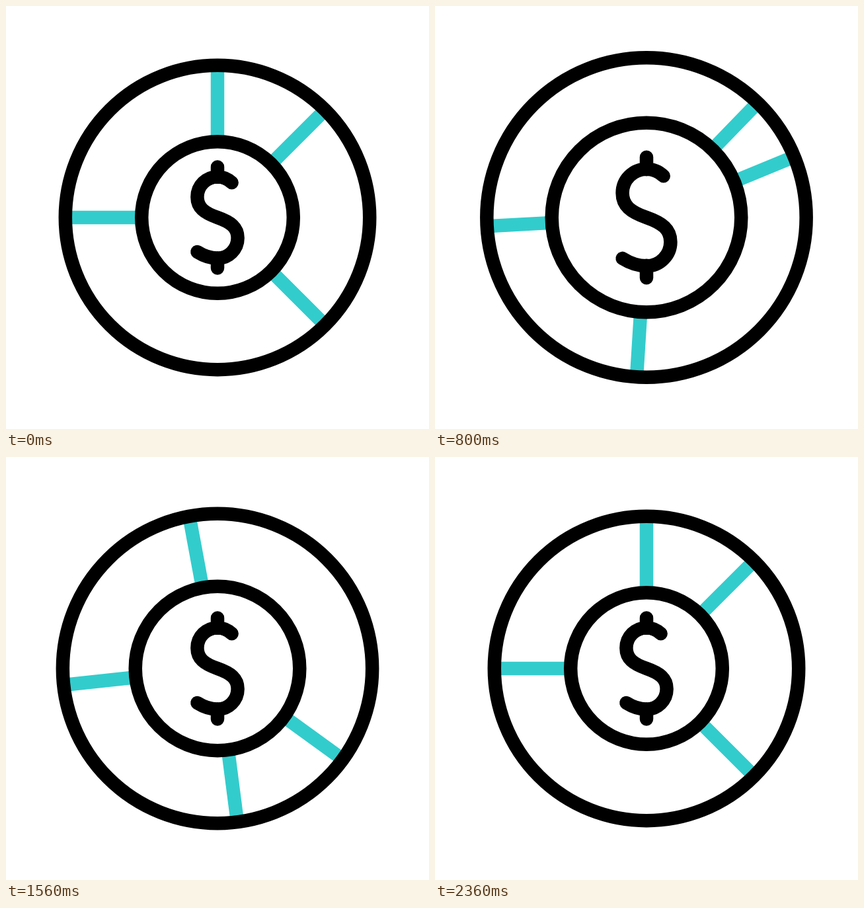
Recreate the animation shown at these times as an HTML page with a canvas. Size 640 by 640 pixels, loop 2420 ms.

```html
<!DOCTYPE html>
<html lang="en">
<head>
<meta charset="utf-8">
<title>Pie chart with dollar sign</title>
<style>
  html, body { margin: 0; width: 100%; height: 100%; overflow: hidden; background: #fff; }
  canvas { display: block; width: 100vmin; height: 100vmin; }
</style>
</head>
<body>
<canvas id="stage" width="640" height="640"></canvas>
<script>
const ctx = document.getElementById('stage').getContext('2d');
const LOOP = 2420, STEP = 20;
const STROKE = 20.5, OUTER = 230.2, INNER = 114.8, BOWL = 30.6;

// Ease in and out: a cubic curve with handles (0.46, 0) and (0.47, 1).
function ease(x) {
  if (x <= 0 || x >= 1) return x <= 0 ? 0 : 1;
  let lo = 0, hi = 1;
  while (hi - lo > 1e-6) {
    const u = (lo + hi) / 2, v = 1 - u;
    if (1.38 * u * v * v + 1.41 * u * u * v + u ** 3 < x) lo = u; else hi = u;
  }
  return lo * lo * (3 - 2 * lo);
}

const progress = (t, start, end) => ease((t - start) / (end - start));

// Scale that shrinks to a dip, swells to a peak, holds, then settles back to 1.
function pulse(t, { dip, dipAt, peak, peakAt, leaveAt, restAt }) {
  return 1 + (dip - 1) * progress(t, 100, dipAt)
    + (peak - dip) * progress(t, dipAt, peakAt)
    + (1 - peak) * progress(t, leaveAt, restAt);
}

const outerPulse = { dip: 0.845, dipAt: 335, peak: 1.05, peakAt: 812, leaveAt: 893, restAt: 2093 };
const innerPulse = { dip: 0.95, dipAt: 286, peak: 1.25, peakAt: 840, leaveAt: 943, restAt: 2037 };
const signPulse = { dip: 0.95, dipAt: 224, peak: 1.19, peakAt: 742, leaveAt: 955, restAt: 1486 };

// Every spoke makes one full turn, resting partway round.
const spokes = [
  { angle: 0, pause: 68.6 },
  { angle: 45, pause: 140.5 },
  { angle: 135, pause: 133.7 },
  { angle: 270, pause: 136 },
];

function spokeAngle(t, { angle, pause }) {
  const turn = pause * progress(t, 142, 876) + (360 - pause) * progress(t, 1025, 2360);
  return (angle + turn) * Math.PI / 180;
}

function dollarSign() {
  const path = new Path2D();
  for (const side of [-1, 1]) {
    path.moveTo(0, side * 76.6);
    path.lineTo(0, side * 2 * BOWL);
  }
  path.moveTo(BOWL * Math.SQRT1_2, -31 - BOWL * Math.SQRT1_2);
  path.arc(0, -31, BOWL, -Math.PI / 4, Math.PI, true);
  path.bezierCurveTo(-BOWL, -15, -20, -7, 0, 0);
  path.bezierCurveTo(20, 7, BOWL, 15, BOWL, 31);
  path.arc(0, 31, BOWL, 0, Math.PI / 2);
  path.bezierCurveTo(-11, 31 + BOWL, -21, 58, -BOWL, 52);
  return path;
}
const sign = dollarSign();

function ring(radius) {
  ctx.beginPath();
  ctx.arc(0, 0, radius, 0, 2 * Math.PI);
  ctx.stroke();
}

function draw(t) {
  const outer = OUTER * pulse(t, outerPulse);
  const inner = INNER * pulse(t, innerPulse);
  const size = pulse(t, signPulse);
  ctx.setTransform(1, 0, 0, 1, 0, 0);
  ctx.fillStyle = '#fff';
  ctx.fillRect(0, 0, 640, 640);
  ctx.translate(320, 320);

  ctx.lineWidth = STROKE;
  ctx.lineCap = 'butt';
  ctx.strokeStyle = '#33cccc';
  for (const spoke of spokes) {
    const angle = spokeAngle(t, spoke);
    const x = Math.sin(angle), y = -Math.cos(angle);
    ctx.beginPath();
    ctx.moveTo(x * inner, y * inner);
    ctx.lineTo(x * outer, y * outer);
    ctx.stroke();
  }

  ctx.strokeStyle = '#000';
  ring(outer);
  ring(inner);

  ctx.lineCap = ctx.lineJoin = 'round';
  ctx.scale(size, size);
  ctx.lineWidth = STROKE / size;
  ctx.stroke(sign);
}

const origin = performance.now();
function tick() {
  const t = (performance.now() - origin) % LOOP;
  draw(Math.floor(t / STEP) * STEP);
  requestAnimationFrame(tick);
}
tick();
</script>
</body>
</html>
```
